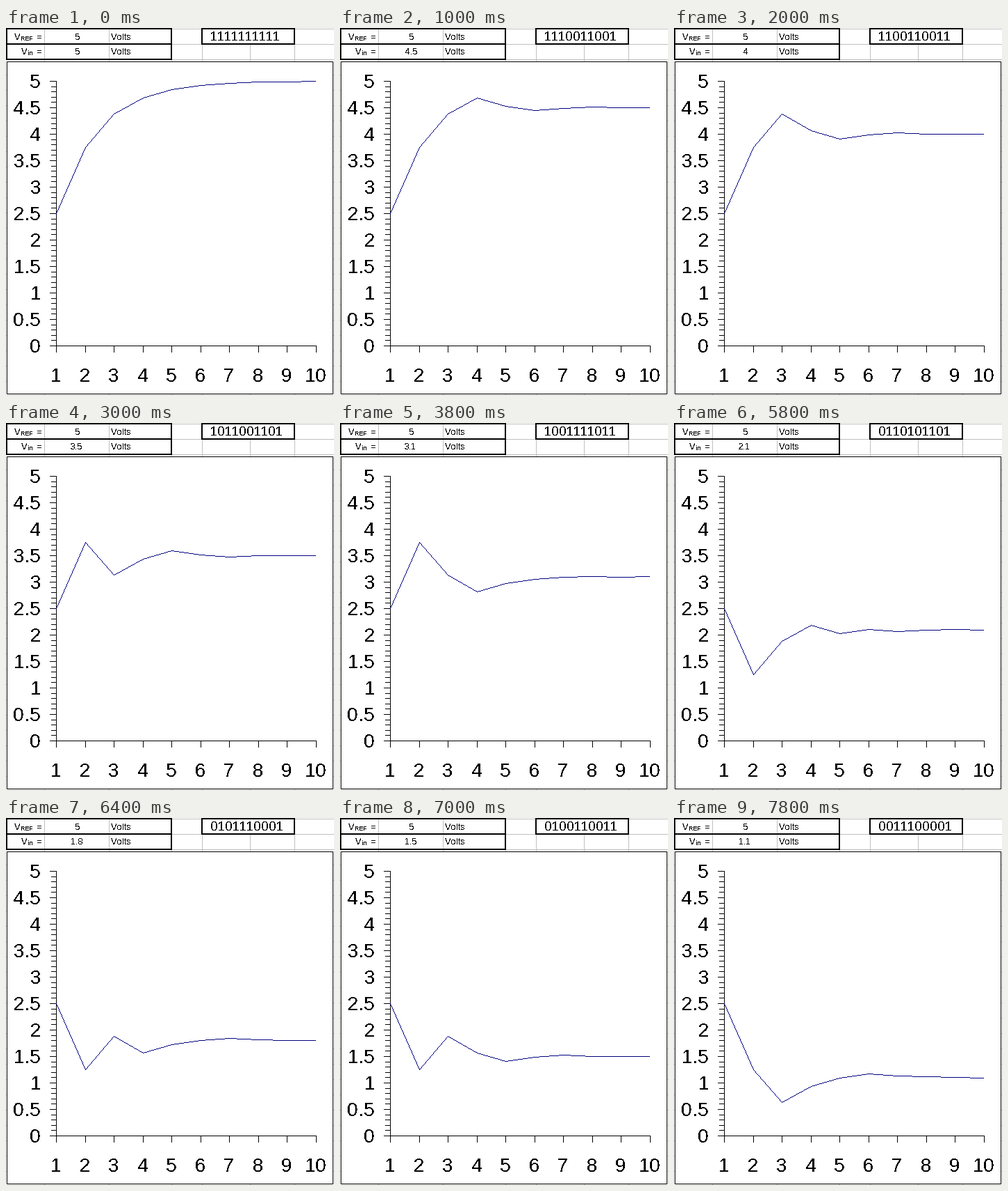
These frames come from a looping animation (472 px wide and 527 px high, 8 s). A matplotlib script:

```python
import numpy as np
import matplotlib.pyplot as plt
from matplotlib.animation import FuncAnimation
from matplotlib.patches import Rectangle

W, H, DPI = 472, 527, 64
PX = 72 / DPI                      # points per pixel
FRAMES, STEP_MS = 40, 200
VREF, BITS = 5, 10
GRID, NAVY = "#c0c0c0", (0, 0, 128, 255)
X0, DX = 72, 41.5                  # first tick and tick spacing
Y0, DY = 456, 76                   # zero line and pixels per volt

plt.rcParams.update({
    "font.family": "Liberation Sans",
    "text.antialiased": False,
    "text.hinting": "force_autohint",
    "text.hinting_factor": 1,
    "text.kerning_factor": 12,     # effectively no pair kerning
    "toolbar": "None",
})

fig = plt.figure(figsize=(W / DPI, H / DPI), dpi=DPI, facecolor="white")
ax = fig.add_axes([0, 0, 1, 1])
ax.axis("off")

xs = np.floor(X0 + DX * np.arange(BITS) + 0.5).astype(int)


def bar(x0, y0, x1, y1, color="black"):
    """Fill the pixels from (x0, y0) to (x1, y1), both included."""
    ax.add_patch(Rectangle((x0, y0), x1 - x0 + 1, y1 - y0 + 1, lw=0,
                           fc=color, antialiased=False))


def frame(x0, y0, x1, y1, w):
    bar(x0, y0, x1, y0 + w - 1)
    bar(x0, y1 - w + 1, x1, y1)
    bar(x0, y0, x0 + w - 1, y1)
    bar(x1 - w + 1, y0, x1, y1)


def label(x, y, s, size, ha="left"):
    return ax.text(x, y, s, fontsize=size * PX, ha=ha, va="baseline")


def draw_sheet():
    for y in range(1, H, 22):
        bar(0, y, W - 1, y, GRID)
    for x in (55, 148, 238, 282, 351, 415):
        bar(x, 0, x, H - 1, GRID)
    bar(283, 2, 413, 21, "white")          # merged cell
    frame(0, 0, 238, 23, 2)
    frame(0, 22, 238, 45, 2)
    frame(281, 0, 415, 23, 2)
    for y, x, sub in ((17, 12, "REF"), (38, 22, "in")):
        label(x, y, "V", 13)
        label(x + 9, y + 1, sub, 9)
        label(44, y, "=", 13)
        label(151, y, "Volts", 13)
    label(99, 17, str(VREF), 13)


def draw_chart():
    bar(1, 48, 470, 525, "white")
    frame(1, 48, 470, 525, 1)
    bar(X0, Y0 - VREF * DY, X0, Y0)
    bar(X0, Y0, xs[-1], Y0)
    for i in range(VREF * 10 + 1):
        y = round(Y0 - i * DY / 10)
        major = i % 5 == 0
        bar(63 if major else 65, y, X0, y)
        if major:
            label(50, y + 10, f"{i / 10:g}", 28, "right")
    for k, x in enumerate(xs):
        bar(x, Y0, x, Y0 + 9)
        s = str(k + 1)
        label(x - 8 * len(s), 508, s, 28)


def convert(vin):
    """Successive approximation: trial voltages and the resulting bits."""
    lsb = VREF / 2 ** BITS
    code, trials, bits = 0, [], ""
    for k in range(BITS):
        weight = 2 ** (BITS - 1 - k)
        trial = (code + weight) * lsb
        trials.append(trial)
        keep = k == BITS - 1 or trial + lsb / 2 < vin
        code += weight * keep
        bits += str(int(keep))
    return np.array(trials), bits


def trace(ys):
    """One-pixel polyline through (xs, ys), without its last pixel."""
    img = np.zeros((H, W, 4), np.uint8)
    for k in range(BITS - 1):
        n = max(xs[k + 1] - xs[k], abs(ys[k + 1] - ys[k]))
        t = np.arange(n) / n
        px = np.rint(xs[k] + t * (xs[k + 1] - xs[k])).astype(int)
        py = np.rint(ys[k] + t * (ys[k + 1] - ys[k])).astype(int)
        img[py, px] = NAVY
    return img


draw_sheet()
draw_chart()
vin_text = label(99, 38, "", 13)
code_text = label(294, 18, "", 19)
curve = ax.imshow(np.zeros((H, W, 4), np.uint8), extent=(0, W, H, 0),
                  aspect="auto", interpolation="nearest", zorder=4)
ax.set_xlim(0, W)
ax.set_ylim(H, 0)


def update(i):
    vin = round(VREF - 0.1 * i, 1)
    trials, bits = convert(vin)
    s = f"{vin:g}"
    vin_text.set_text(s)
    vin_text.set_x(93 if "." in s else 99)
    code_text.set_text(bits)
    curve.set_data(trace(np.ceil(Y0 - DY * trials - 0.5).astype(int)))
    return vin_text, code_text, curve


anim = FuncAnimation(fig, update, frames=FRAMES, interval=STEP_MS,
                     init_func=lambda: update(0), repeat=True,
                     repeat_delay=0, blit=False)
plt.show()
```
